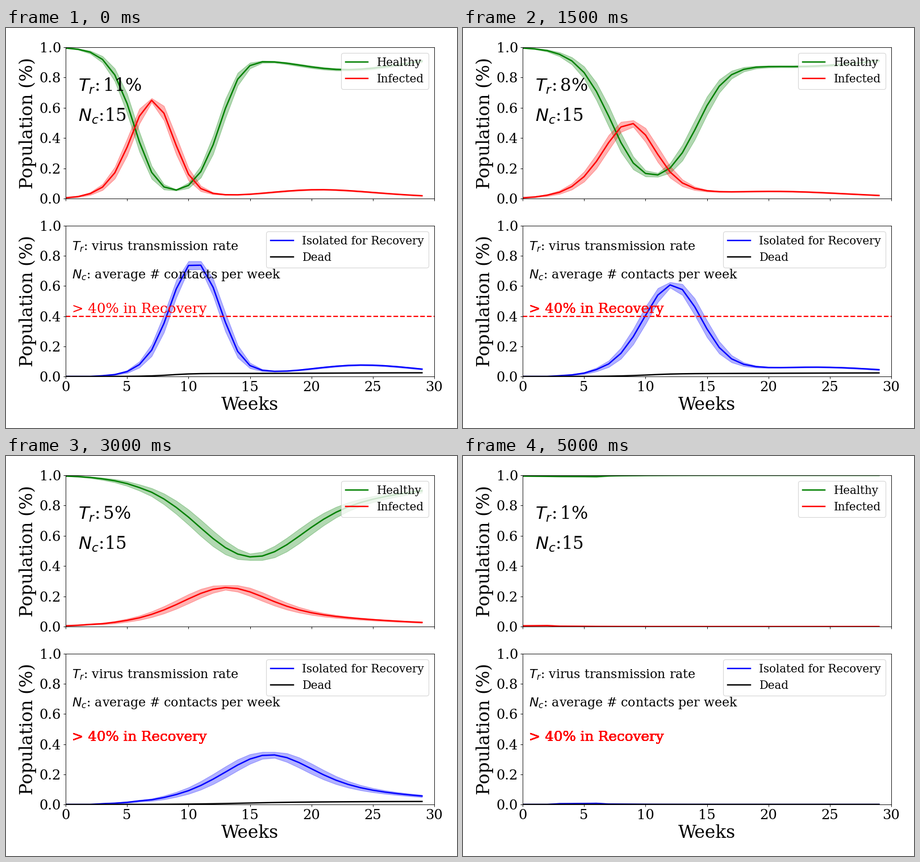
Write a matplotlib script that moves like this. It is 794x706 px and loops after 5500 ms.

```python
import numpy as np
import matplotlib.pyplot as plt
from matplotlib.animation import FuncAnimation

W, H, DPI = 794, 706, 80
TICK, LABEL, LEGEND, NOTE = 21.75, 28, 17.8, 19.75
RATES = list(range(11, 0, -1))
CONTACTS = 15
WEEKS = np.arange(30)

plt.rcParams.update({
    "font.family": "DejaVu Serif",
    "xtick.labelsize": TICK,
    "ytick.labelsize": TICK,
    "axes.labelsize": LABEL,
    "legend.fontsize": LEGEND,
})


def new_cases(rate):
    """Weekly infections; people spread the virus for 3 weeks."""
    cases = np.zeros(len(WEEKS))
    cases[0] = .005
    fresh, recovered = 1 - cases[0], 0
    keep = 1 - .0065 * rate  # immunity hardens faster at high rates
    for t in WEEKS[1:]:
        infected = cases[max(0, t - 3):t].sum()
        risk = .9 * (1 - (1 - rate / 100) ** (CONTACTS * infected))
        first, again = risk * fresh, .42 * risk * recovered
        cases[t] = first + again
        fresh -= first
        recovered = keep * (recovered - again)
        if t >= 7:
            recovered += .98 * cases[t - 7]
    return cases


def delay(c, n):
    return np.concatenate([np.zeros(n), c[:-n]])


def epidemic(rate):
    """Infected for 3 weeks, isolated for 4, of whom 2% die."""
    total = new_cases(rate).cumsum()
    ill, done = delay(total, 3), delay(total, 7)
    infected = total - ill
    isolated = .98 * (ill - done)
    dead = .02 * ill
    return 1 - infected - isolated - dead, infected, isolated, dead


def spread(v, rate):
    """Timing jitter plus sampling noise, both larger in slow outbreaks."""
    jitter = min(2.6 / rate, 1) * np.abs(np.gradient(v))
    noise = min(.05 + .3 * (3 / rate) ** 5, .35)
    return jitter + noise * np.abs(v * (1 - v))


fig = plt.figure(figsize=(W / DPI, H / DPI), dpi=DPI, facecolor="white")


def panel(top, bottom):
    ax = fig.add_axes([105 / W, 1 - bottom / H, 649 / W, (bottom - top) / H])
    ax.set(xlim=(0, 30), ylim=(0, 1), ylabel="Population (%)")
    ax.set_xticks(range(0, 31, 5))
    ax.set_yticks(np.linspace(0, 1, 6))
    return ax


upper = panel(34, 301)
lower = panel(349, 615)
upper.tick_params(labelbottom=False)
lower.set_xlabel("Weeks")

SERIES = [(upper, "g", "Healthy"), (upper, "r", "Infected"),
          (lower, "b", "Isolated for Recovery"), (lower, "k", "Dead")]
lines = [ax.plot([], [], color=c, lw=2.2, label=name)[0] for ax, c, name in SERIES]
for ax in (upper, lower):
    ax.legend(loc="upper right")

limit = lower.axhline(.4, color="r", ls="--", lw=2)
rate_text = upper.text(1, .71, "", fontsize=27.65)
upper.text(1, .51, f"$N_c$:{CONTACTS}", fontsize=27.65)
lower.text(.5, .835, "$T_r$: virus transmission rate", fontsize=NOTE)
lower.text(.5, .652, "$N_c$: average # contacts per week", fontsize=NOTE)
# The warning is stamped once more on every step, so its edges thicken.
stamps = [lower.text(.5, .42, "> 40% in Recovery", color="r", fontsize=22.1)
          for _ in RATES]
bands = []


def update(i):
    while bands:
        bands.pop().remove()
    rate = RATES[i]
    data = epidemic(rate)
    for (ax, color, _), line, v in zip(SERIES, lines, data):
        line.set_data(WEEKS, v)
        if color != "k":
            e = spread(v, rate)
            bands.append(ax.fill_between(WEEKS, v - e, v + e, color=color, alpha=.3))
    limit.set_visible(data[2].max() > .4)
    rate_text.set_text(rf"$T_r$:$\,${rate}%")
    for n, stamp in enumerate(stamps):
        stamp.set_visible(n <= i)
    return lines


anim = FuncAnimation(fig, update, frames=len(RATES), interval=500,
                     repeat=True, repeat_delay=0)
plt.show()
```
